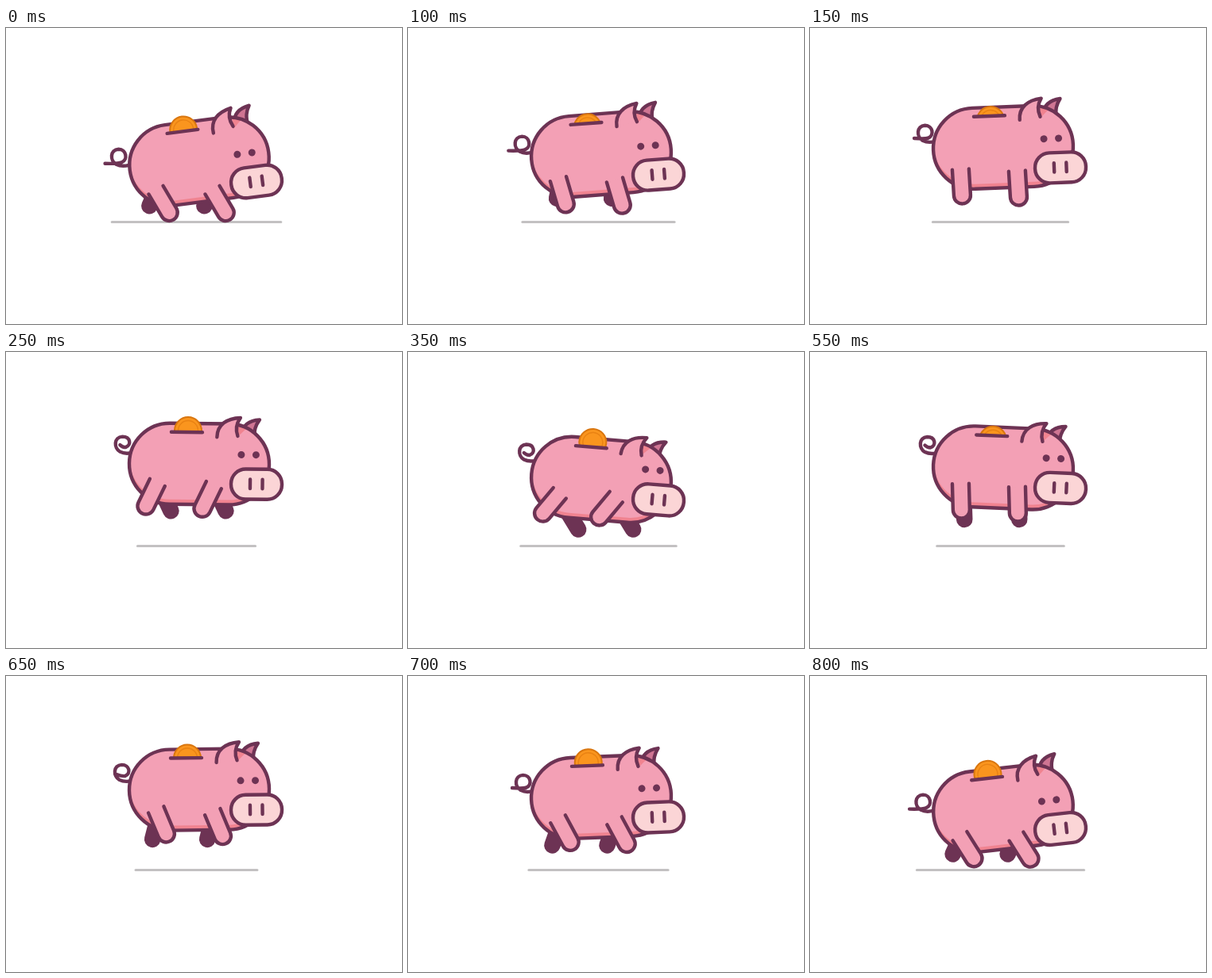
Animation of 498 by 373 pixels, one loop 0.85 s. Source, as an HTML page with a canvas:

```html
<!DOCTYPE html>
<html lang="en">
<head>
<meta charset="utf-8">
<title>Galloping piggy bank</title>
<style>
html, body { margin: 0; width: 100%; height: 100%; overflow: hidden; background: #fff; }
canvas { display: block; width: 498px; height: 373px; }
</style>
</head>
<body>
<canvas id="stage" width="498" height="373"></canvas>
<script>
const ctx = document.getElementById('stage').getContext('2d');
const LOOP = 850, STEP = 50, CX = 243;
const INK = '#6d3354', PINK = '#f3a0b5', SHADE = '#f08390', SNOUT = '#fbd5d6';

const { sin, cos, PI } = Math;
const rad = deg => deg * PI / 180;
const mix = (a, b, u) => a + (b - a) * u;

// One gallop: two hops per loop, while the body rocks and the legs swing once
function pose(t) {
  const w = 2 * PI * t / LOOP, c = cos(w);
  const y = 155.5 + 14 * cos(2 * w) - 1.3 * sin(2 * w) - 3.5 * cos(3 * w) + 2 * c;
  const swing = 1 + 36 * cos(w + rad(30)) + 5 * sin(2 * w - rad(20));
  return {
    y,
    swing,
    tilt: -3.5 * c - 3.5 * c ** 3 - 0.4,
    footX: 2 - 0.48 * swing,
    footY: 60.5 - 5 * cos(w - rad(32)),
    coinH: 18.3 - 5.5 * sin(2 * w) + 1.5 * cos(2 * w),
    half: 76 + 1.2 * (y - 141.5)
  };
}

function at(x, y, deg, draw) {
  ctx.save();
  ctx.translate(x, y);
  ctx.rotate(rad(deg));
  draw();
  ctx.restore();
}

function paint(path, fill, stroke = INK, width = 4.4) {
  if (fill) { ctx.fillStyle = fill; ctx.fill(path); }
  if (stroke) { ctx.strokeStyle = stroke; ctx.lineWidth = width; ctx.stroke(path); }
}

function pill(x, y, w, h, r) {
  const p = new Path2D();
  p.roundRect(x, y, w, h, r);
  return p;
}

function disc(x, y, r) {
  const p = new Path2D();
  p.arc(x, y, r, 0, 2 * PI);
  return p;
}

const line = (x1, y1, x2, y2) => new Path2D(`M${x1},${y1}L${x2},${y2}`);

const torso = pill(-88, -51, 176, 102, 51);
const litTorso = pill(-88, -57, 176, 102, 51);
const earShade = new Path2D('M48,-54L64,-49Q56,-43 48,-35Z');
const farEar = new Path2D('M52,-38C54,-50 62,-56 75,-57C70,-50 68,-44 69,-32');
const nearEar = new Path2D('M-8,2C-8,-14 4,-22 21,-23C16,-16 15,-8 18,0');
const nearLeg = new Path2D('M-10.5,-2V31A10.5,10.5 0 0 0 10.5,31V-2');

// u = 0 curls the tip inwards, u = 1 lets it stick out behind
function tail(u) {
  const low = mix(4, 7, u);
  return new Path2D(`M13,10.5Q4,13 -3,9.5C-11,5 -11,-9 0,-9.5C10,-9.5 12,${low - 3} 4,${low}` +
    `Q0,${low + 2 * u} ${mix(-3, -17, u)},${mix(1, 8.5, u)}`);
}

function coin(h) {
  ctx.save();
  ctx.beginPath();
  ctx.rect(-45, -100, 60, 60);
  ctx.clip();
  const y = -22 - h;
  paint(disc(-14.5, y, 17), '#fa951e', '#d9760f', 2);
  paint(disc(-14.5, y, 12.5), null, '#e98213', 1.4);
  ctx.restore();
}

function draw(t) {
  const { y, tilt, swing, footX, footY, coinH, half } = pose(t);
  ctx.fillStyle = '#fff';
  ctx.fillRect(0, 0, 498, 373);
  ctx.lineCap = ctx.lineJoin = 'round';

  paint(line(241 - half, 244.5, 238 + half, 244.5), null, '#c3c1c2', 3);

  for (const x of [-50, 19])
    at(CX, y, 0, () => paint(line(x, 28, x + footX, footY), null, INK, 20.5));

  at(CX, y, tilt * 1.5, () => paint(farEar, '#cf7593'));
  at(CX - 97 + tilt * 0.6, y - 23.5 - tilt * 2.4, 0, () =>
    paint(tail(Math.min(1, Math.max(0, -tilt / 3))), null));

  at(CX, y, tilt, () => {
    ctx.save();
    ctx.clip(torso);
    paint(torso, SHADE, null);
    paint(litTorso, PINK, null);
    paint(earShade, SHADE, null);
    ctx.restore();
    paint(torso, null);
    coin(coinH);
    paint(line(-35.5, -40, 3.5, -40), null);
    at(30, -36, tilt, () => paint(nearEar, PINK));
  });

  for (const [x, hip] of [[-53.5, 26 - 1.6 * tilt], [17.5, 29 - 1.2 * tilt]])
    at(CX + x, y + hip, -swing, () => paint(nearLeg, PINK));

  at(315, y + 25.5, tilt, () => {
    for (const x of [-19.5, -1]) paint(disc(x, -37, 4.5), INK, null);
    paint(pill(-32, -19, 64, 38, 18.5), SNOUT);
    for (const x of [-8, 7.5]) paint(line(x, -6, x, 5.5), null);
  });
}

function tick() {
  const t = performance.now() % LOOP;
  draw(Math.floor(t / STEP) * STEP);
  requestAnimationFrame(tick);
}
tick();
</script>
</body>
</html>
```
